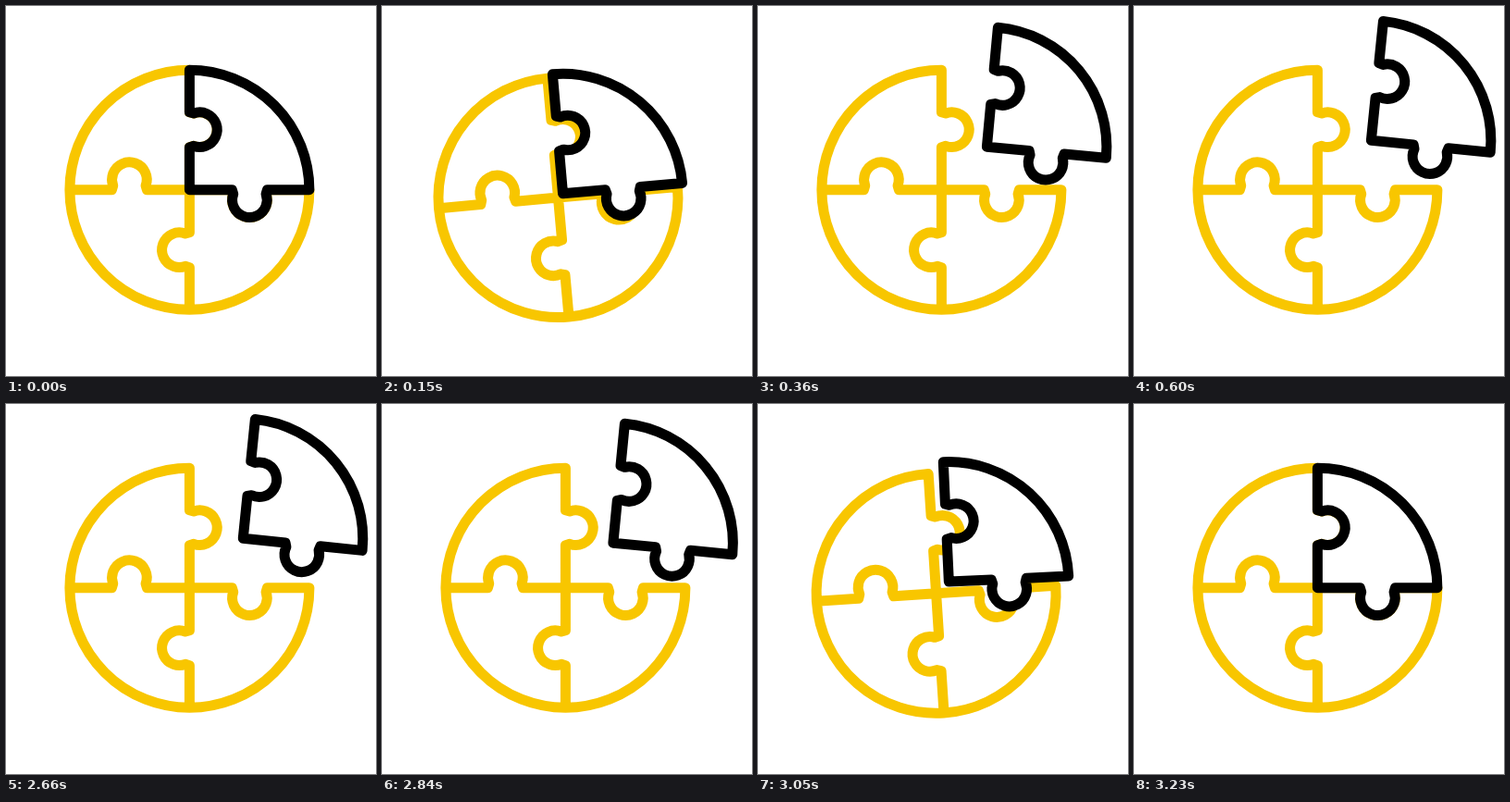
These frames come from a looping animation (400 by 400 pixels, 3760 ms). An HTML page with a canvas:

```html
<!DOCTYPE html>
<html lang="en">
<head>
<meta charset="utf-8">
<title>Puzzle circle</title>
<style>
  html, body { margin: 0; width: 100%; height: 100%; overflow: hidden; background: #fff; }
  canvas { display: block; width: 400px; height: 400px; }
</style>
</head>
<body>
<canvas id="stage" width="400" height="400"></canvas>
<script>
const ctx = document.getElementById('stage').getContext('2d');
const LOOP = 3760, STEP = 30, SPAN = 600, BACK = 2660;
const PEAK = 90, SETTLE = 300, TURNED = 480;
const CX = 198.4, CY = 198.7, R = 129.5, TAU = Math.PI * 2;
const TAB = { at: 65, depth: 11, r: 18.8, half: 19, lip: 0.35 };

// Poses: offset of the pivot and rotation in degrees
const HOME = { x: 0, y: 0, a: 0 };
const RING_IN = { x: -9, y: 9.5, a: -5.8 };
const PIECE_IN = { x: -13.8, y: 5.2, a: -5.8 };
const PIECE_OUT = { x: 62.3, y: -48.7, a: 5.8 };
const RING_PIVOT = [0, 0], PIECE_PIVOT = [45, -45];

// Adds one spoke with its round tab, read outward or inward
function spoke(path, angle, inward) {
  const c = Math.cos(angle), s = Math.sin(angle);
  const pt = (x, y) => [x * c - y * s, x * s + y * c];
  const line = x => path.lineTo(...pt(x, 0));
  const near = TAB.at - TAB.half, far = TAB.at + TAB.half;
  const a0 = angle + Math.PI + TAB.lip, a1 = angle - TAB.lip;
  const mid = pt(TAB.at, TAB.depth);
  line(inward ? R : 0);
  line(inward ? far : near);
  if (inward) path.arc(...mid, TAB.r, a1, a0, false);
  else path.arc(...mid, TAB.r, a0, a1, true);
  line(inward ? near : far);
  line(inward ? 0 : R);
}

const base = new Path2D();
base.arc(0, 0, R, 0, TAU * 0.75);
for (let i = 0; i < 4; i++) {
  base.moveTo(0, 0);
  spoke(base, i * TAU / 4, false);
}

const piece = new Path2D();
spoke(piece, -TAU / 4, true);
spoke(piece, 0, false);
piece.arc(0, 0, R, 0, -TAU / 4, true);
piece.closePath();

function mix(p, q, k, turn = k) {
  return { x: p.x + (q.x - p.x) * k, y: p.y + (q.y - p.y) * k, a: p.a + (q.a - p.a) * turn };
}

// Cubic bezier easing (x1, 0, x2, 1) from PEAK to end
function ease(u, end, x1, x2) {
  if (u >= end) return 1;
  const p = (u - PEAK) / (end - PEAK);
  let lo = 0, hi = 1;
  for (let i = 0; i < 30; i++) {
    const t = (lo + hi) / 2, n = 1 - t;
    const x = 3 * n * n * t * x1 + 3 * n * t * t * x2 + t * t * t;
    if (x < p) lo = t; else hi = t;
  }
  return lo * lo * (3 - 2 * lo);
}

// Progress in ms: 0 is assembled, SPAN is fully apart
function progress(t) {
  if (t < BACK) return Math.min(SPAN, Math.floor(t / STEP) * STEP);
  return Math.max(0, SPAN - (Math.floor((t - BACK) / STEP) + 1) * STEP);
}

function poses(u) {
  if (u <= PEAK) {
    const k = u / PEAK;
    return [mix(HOME, RING_IN, k), mix(HOME, PIECE_IN, k)];
  }
  const rest = ease(u, SETTLE, 0.6, 0.36);
  const move = ease(u, SPAN, 0.29, 0.05);
  const turn = ease(u, TURNED, 0.43, 0);
  return [mix(RING_IN, HOME, rest), mix(PIECE_IN, PIECE_OUT, move, turn)];
}

function draw(path, pose, [px, py], color, fill) {
  ctx.save();
  ctx.translate(CX + pose.x + px, CY + pose.y + py);
  ctx.rotate(pose.a * Math.PI / 180);
  ctx.translate(-px, -py);
  if (fill) {
    ctx.fillStyle = fill;
    ctx.fill(path);
  }
  ctx.strokeStyle = color;
  ctx.stroke(path);
  ctx.restore();
}

function frame() {
  const [ring, part] = poses(progress(performance.now() % LOOP));
  ctx.fillStyle = '#fff';
  ctx.fillRect(0, 0, 400, 400);
  ctx.lineWidth = 11;
  ctx.lineCap = ctx.lineJoin = 'round';
  draw(base, ring, RING_PIVOT, '#f8c600');
  draw(piece, part, PIECE_PIVOT, '#000', '#fff');
  requestAnimationFrame(frame);
}
frame();
</script>
</body>
</html>
```
